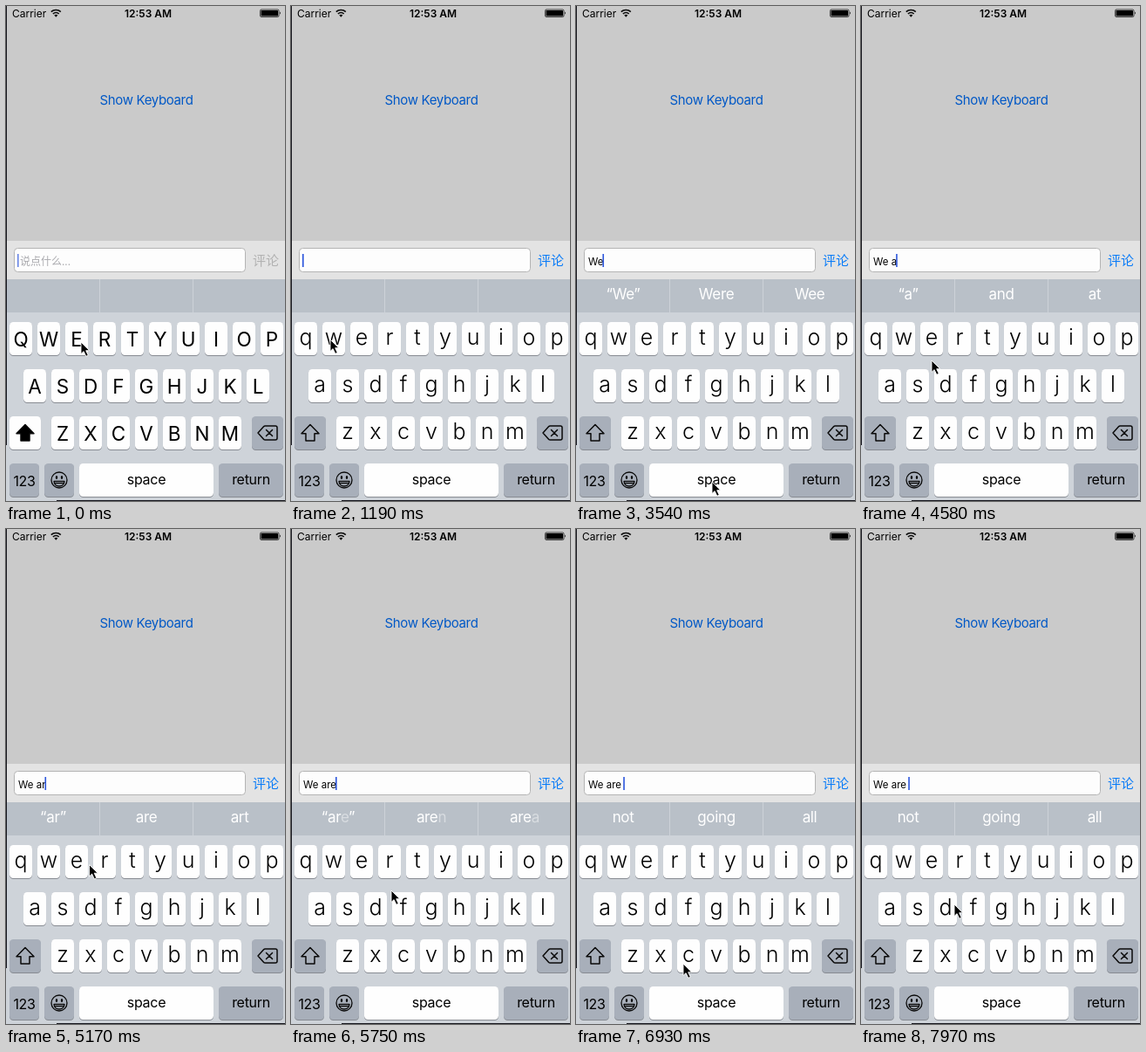
These frames come from a looping animation (320 px wide and 567 px high, 8000 ms). An HTML page:

```html
<!DOCTYPE html>
<html lang="en">
<head>
<meta charset="utf-8">
<title>Keyboard input</title>
<style>
html, body { margin: 0; width: 100%; height: 100%; overflow: hidden; background: #cacaca; }
svg { display: block; width: 100vw; height: 100vh; }
text { font-family: Inter, "Open Sans", sans-serif; white-space: pre; }
.cjk { font-family: "Noto Sans CJK SC", "Noto Sans CJK", sans-serif; }
.mid { text-anchor: middle; }
.upper { font-size: 22.5px; }
.lower { font-size: 25px; font-weight: 300; }
.word { font-size: 16px; letter-spacing: -.3px; }
.hint { font-size: 17px; letter-spacing: -.35px; fill: #fff; }
.line { fill: none; stroke: #0a0a0a; stroke-width: 1.5; stroke-linejoin: round; stroke-linecap: round; }
</style>
</head>
<body>
<svg viewBox="0 0 320 567" preserveAspectRatio="none">
  <rect width="320" height="567" fill="#cacaca"/>

  <text x="7" y="12.5" font-size="12">Carrier</text>
  <g class="line" stroke-linecap="butt" style="stroke-width:1.7;stroke-linecap:butt">
    <path d="M51.8 6.7a8 8 0 0 1 11 0M53.9 9a5 5 0 0 1 6.8 0"/>
  </g>
  <path d="M57.3 12.8l-2-2.2a2.9 2.9 0 0 1 4 0z"/>
  <text class="mid" x="163" y="12.5" font-size="12" font-weight="600">12:53 AM</text>
  <rect x="291.5" y="4" width="21.5" height="8.5" rx="1.5" fill="none" stroke="#000" stroke-width=".7"/>
  <rect x="292.5" y="5" width="19.5" height="6.5" rx=".6"/>
  <path d="M314 6.6q1.8 1.6 0 3.2z"/>

  <text class="mid" x="161" y="112.5" font-size="15" letter-spacing="-.35" fill="#0058c6">Show Keyboard</text>

  <rect y="269" width="320" height="44" fill="#e3e3e3"/>
  <rect x="9.5" y="277.5" width="265" height="27" rx="4" fill="#fdfdfd" stroke="#b4b4b4"/>
  <text id="empty" class="cjk" x="16" y="296.5" font-size="12" fill="#a9a9ad">说点什么...</text>
  <text id="typed" x="14" y="296.5" font-size="11.5"></text>
  <rect id="caret" y="284" width="1.6" height="15" fill="#2b55dc"/>
  <text id="send" class="cjk" x="283" y="296.5" font-size="15">评论</text>

  <rect y="313" width="320" height="254" fill="#ced3d9"/>
  <rect y="313" width="320" height="38" fill="#b9c0c8"/>
  <path d="M107.5 313v38M214.5 313v38" stroke="#cdd2d8"/>
  <g id="hints"></g>
  <g id="keys"></g>

  <path id="shift" class="line" d="M22 479.5L32 489.7H27V498H17V489.7H12Z"/>
  <path class="line" d="M289 489l6.5-7.2q.7-.8 1.8-.8H309q2 0 2 2v12q0 2-2 2h-11.700q-1.100 0-1.800-.8zM298.500 485.500l7 7m0-7l-7 7"/>
  <g class="line" style="stroke-width:1.3">
    <circle cx="61" cy="543" r="9"/>
    <path d="M55 544.500h12q-.6 5.500-6 5.500t-6-5.500zM56.500 546.700h9"/>
  </g>
  <ellipse cx="58" cy="540" rx="1.200" ry="1.900"/>
  <ellipse cx="64" cy="540" rx="1.200" ry="1.900"/>

  <rect width="1" height="503" fill="#15151c"/>
  <rect x="58" y="566" width="262" height="1" fill="#15151c"/>

  <path id="mouse" d="M0 0V13.500L3.100 10.600L5.800 16.300L8.300 15.200L5.700 9.700H9.800Z" stroke="#fff" stroke-width=".9"/>
</svg>
<script>
const LOOP = 8000, TICK = 147.5, FIRST_KEY = 8;
const $ = id => document.getElementById(id);

// tick, x, y
const path = [
  [0, 86, 385], [1, 83, 384], [2, 83, 384], [7, 45, 382], [11, 45, 382],
  [15, 79, 384], [18, 79, 384], [24, 156, 545], [25, 152, 540], [26, 140, 514],
  [29, 34, 437], [30, 34, 437], [31, 81, 406], [33, 111, 384], [34, 111, 384],
  [36, 80, 385], [38, 81, 386], [39, 115, 414], [42, 148, 537], [43, 152, 544],
  [45, 152, 544], [47, 123, 498], [50, 119, 466], [54, 107, 430]
];

const typing = [
  [0, ''], [9, 'W'], [15, 'We'], [25, 'We '], [30, 'We a'],
  [34, 'We ar'], [38, 'We are'], [44, 'We are ']
];

// "~" marks a letter still fading in
const hints = [
  [0, ['', '', '']],
  [15, ['“We”', 'Were', 'Wee']],
  [25, ['', '', '']],
  [30, ['“a”', 'and', 'at']],
  [34, ['“ar”', 'are', 'art']],
  [38, ['“ar~e”', 'are~n', 'are~a']],
  [40, ['“are”', 'aren', 'area']],
  [44, ['not', 'going', 'all']]
];

const caretOff = [[1, 3], [12, 14], [18, 20], [28, 29], [41, 43], [49, 51]];

const at = (table, n) => table.filter(row => row[0] <= n).pop()[1];

function mouseAt(n) {
  const i = path.findIndex(p => p[0] >= n);
  if (i < 1) return path[i < 0 ? path.length - 1 : 0].slice(1);
  const [n0, x0, y0] = path[i - 1], [n1, x1, y1] = path[i];
  const k = (n - n0) / (n1 - n0);
  return [x0 + (x1 - x0) * k, y0 + (y1 - y0) * k];
}

function key(x, y, w, fill, id = '') {
  const box = (dy, color, name) =>
    `<rect ${name} x="${x}" y="${y + dy}" width="${w}" height="38" rx="4.500" fill="${color}"/>`;
  return box(1, '#878b92', '') + box(0, fill, id && `id="${id}"`);
}

function buildKeys() {
  const white = '#fefefe', gray = '#a8afba';
  let out = '';
  [['qwertyuiop', 4], ['asdfghjkl', 20], ['zxcvbnm', 52]].forEach(([row, left], r) => {
    [...row].forEach((c, i) => {
      const x = left + 32 * i, y = 362 + 54 * r;
      out += key(x, y, 26, white) +
        `<text class="mid letter" x="${x + 13}" y="${y + 28}">${c}</text>`;
    });
  });
  out += key(4, 470, 36, gray, 'shiftKey') + key(282, 470, 36, gray);
  out += key(4, 524, 34, gray) + key(44, 524, 34, gray);
  out += key(84, 524, 154, white) + key(244, 524, 74, gray);
  [['123', 21, 549.5], ['space', 161, 548], ['return', 281, 548]].forEach(([s, x, y]) => {
    out += `<text class="mid word" x="${x}" y="${y}">${s}</text>`;
  });
  $('keys').innerHTML = out;
  $('hints').innerHTML = [54, 161, 268]
    .map(x => `<text class="mid hint" x="${x}" y="336"></text>`).join('');
}

buildKeys();
const letters = [...document.querySelectorAll('.letter')];
const hintTexts = [...$('hints').children];

function setCase(lower) {
  letters.forEach((el, i) => {
    const c = el.textContent;
    el.textContent = lower ? c.toLowerCase() : c.toUpperCase();
    el.setAttribute('class', 'mid letter ' + (lower ? 'lower' : 'upper'));
    const row = i < 10 ? 0 : i < 19 ? 1 : 2;
    el.setAttribute('y', 362 + 54 * row + (lower ? 26 : 28));
  });
  $('shift').style.fill = lower ? 'none' : '#000';
  $('shiftKey').setAttribute('fill', lower ? '#a8afba' : '#fefefe');
  $('send').setAttribute('fill', lower ? '#0a7cf8' : '#b2b2b2');
  $('empty').setAttribute('visibility', lower ? 'hidden' : 'visible');
}

function draw(n) {
  setCase(n >= FIRST_KEY);
  const text = at(typing, n);
  $('typed').textContent = text;
  const width = text ? $('typed').getComputedTextLength() : 0;
  $('caret').setAttribute('x', 13 + width);
  const off = caretOff.some(([a, b]) => n >= a && n <= b);
  $('caret').setAttribute('opacity', off ? 0 : n === 0 ? .7 : 1);
  at(hints, n).forEach((s, i) => {
    hintTexts[i].innerHTML = s.replace(/~(.)/, '<tspan fill-opacity=".45">$1</tspan>');
  });
  $('mouse').setAttribute('transform', `translate(${mouseAt(n)})`);
}

let last = -1;
function frame() {
  const n = Math.floor((performance.now() % LOOP + 5) / TICK);
  if (n !== last) draw(last = n);
  requestAnimationFrame(frame);
}
frame();
</script>
</body>
</html>
```
